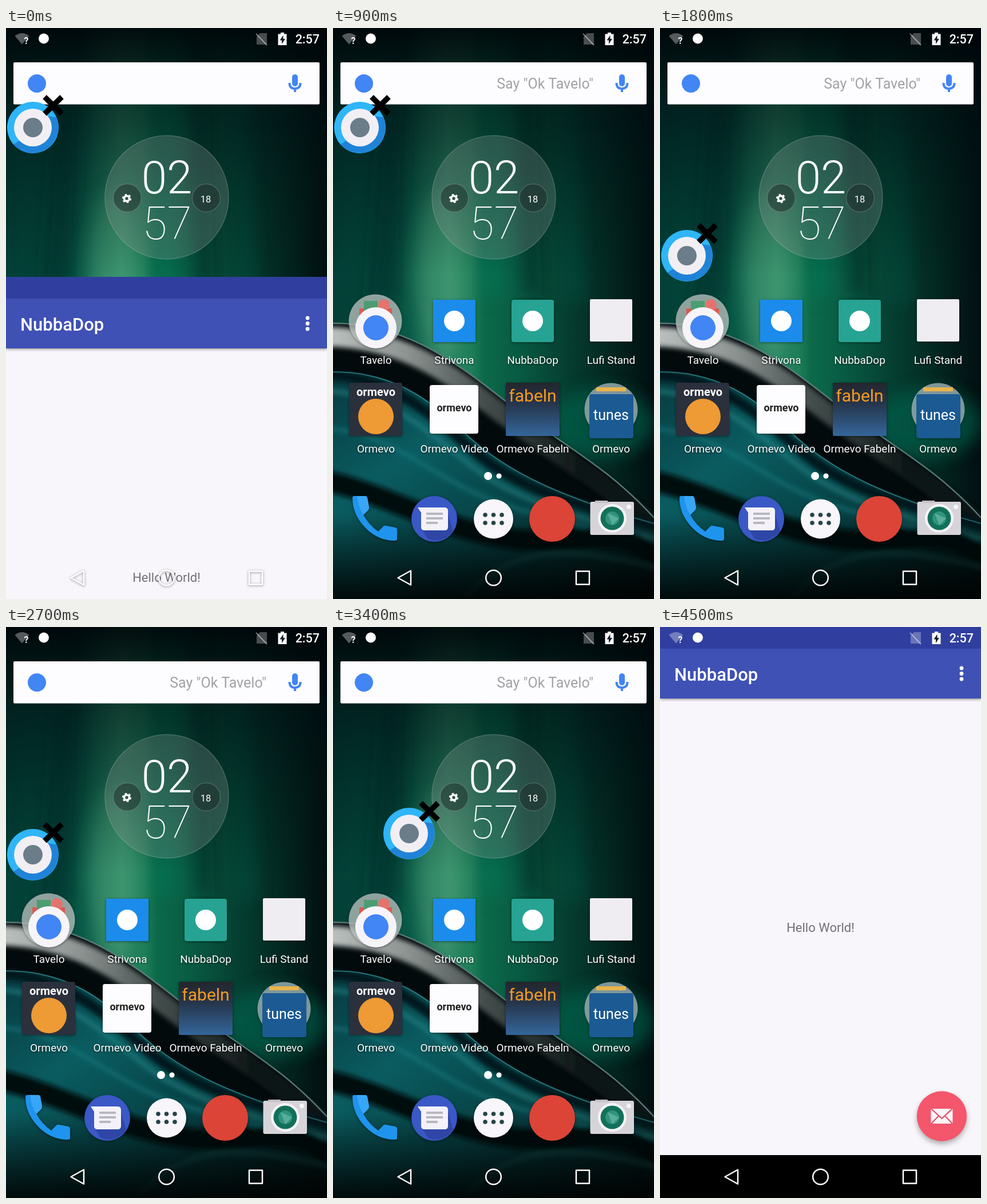
An HTML page for the animation above (4600 ms loop, 561x998 px).

```html
<!DOCTYPE html>
<html lang="en">
<head>
<meta charset="utf-8">
<title>Floating bubble</title>
<style>
  html, body { margin: 0; width: 100%; height: 100%; overflow: hidden; background: #000; }
  #stage { position: fixed; left: 0; top: 0; width: 561px; height: 998px; overflow: clip; contain: strict; }
  svg { position: absolute; left: 0; top: 0; width: 561px; height: 998px; font-family: Roboto, sans-serif; }
  .mid { text-anchor: middle; }
  #labels { font-size: 19px; fill: #fff; text-anchor: middle; filter: drop-shadow(0 1px 1.5px rgba(0,0,0,.7)); }
  .soft { filter: drop-shadow(0 1px 2px rgba(0,0,0,.45)); }
</style>
</head>
<body>
<div id="stage">
<!-- wallpaper -->
<svg viewBox="0 0 561 998">
  <defs>
    <linearGradient id="wash">
      <stop offset="0" stop-color="#033f36"/><stop offset=".12" stop-color="#03463a"/>
      <stop offset=".24" stop-color="#0a5b48"/><stop offset=".36" stop-color="#2b8562"/>
      <stop offset=".43" stop-color="#1f7f5a"/><stop offset=".47" stop-color="#0c6a4a"/>
      <stop offset=".58" stop-color="#085a42"/><stop offset=".74" stop-color="#053c30"/>
      <stop offset=".88" stop-color="#03241f"/><stop offset="1" stop-color="#020f10"/>
    </linearGradient>
    <linearGradient id="shade" x2="0" y2="1">
      <stop offset="0" stop-color="#000407" stop-opacity=".93"/>
      <stop offset=".13" stop-color="#000c10" stop-opacity=".62"/>
      <stop offset=".3" stop-color="#001214" stop-opacity=".27"/>
      <stop offset=".43" stop-color="#001214" stop-opacity="0"/>
    </linearGradient>
    <linearGradient id="rim" gradientUnits="userSpaceOnUse" x1="0" y1="0" x2="440" y2="0">
      <stop offset="0" stop-color="#b9bfbd"/><stop offset=".3" stop-color="#8b9290"/>
      <stop offset=".6" stop-color="#454e4d"/><stop offset="1" stop-color="#0b1414"/>
    </linearGradient>
    <linearGradient id="pool" x2="1" y2="1">
      <stop offset="0" stop-color="#07393f"/><stop offset=".3" stop-color="#0a5c60"/>
      <stop offset=".6" stop-color="#063f42"/><stop offset="1" stop-color="#021112"/>
    </linearGradient>
    <linearGradient id="foot" x2="0" y2="1">
      <stop offset="0" stop-color="#000" stop-opacity="0"/><stop offset="1" stop-color="#000" stop-opacity=".85"/>
    </linearGradient>
    <filter id="b4"><feGaussianBlur stdDeviation="4"/></filter>
    <filter id="b14" x="-50%" y="-50%" width="200%" height="200%"><feGaussianBlur stdDeviation="14"/></filter>
  </defs>
  <rect width="561" height="998" fill="url(#wash)"/>
  <g filter="url(#b14)">
    <ellipse cx="188" cy="430" rx="42" ry="150" fill="#5cae85" opacity=".38"/>
    <path d="M95 0H135L120 480H60Z" fill="#01221f" opacity=".45"/>
    <path d="M255 0H300L300 470H254Z" fill="#10795a" opacity=".4"/>
    <path d="M320 0H350L365 470H330Z" fill="#02201d" opacity=".4"/>
    <path d="M390 0H410L440 480H405Z" fill="#0a5a48" opacity=".3"/>
    <ellipse cx="470" cy="690" rx="90" ry="60" fill="#0a6650" opacity=".6"/>
  </g>
  <rect width="561" height="998" fill="url(#shade)"/>
  <path d="M0 515C120 515 205 575 300 650C400 728 480 765 561 855V998H0Z" fill="#030a0c"/>
  <g fill="none">
    <path d="M-20 539C110 540 190 592 285 666C370 732 450 775 580 885" stroke="url(#rim)" stroke-width="34" filter="url(#b4)"/>
    <path d="M0 516C120 516 205 576 300 651C400 729 480 766 561 856" stroke="#6f9a98" stroke-width="2.5" opacity=".75"/>
  </g>
  <path d="M0 600C90 600 155 634 225 702C300 775 400 820 561 865V998H0Z" fill="url(#pool)"/>
  <g fill="none" filter="url(#b4)">
    <path d="M-20 606C100 606 170 674 250 742S420 830 580 874" stroke="#04191b" stroke-width="18"/>
    <path d="M-20 634C80 634 150 690 230 756S400 848 580 896" stroke="#2a8b8c" stroke-width="8" opacity=".6"/>
    <path d="M-20 700C90 700 160 775 260 818S450 862 580 912" stroke="#148186" stroke-width="9" opacity=".45"/>
    <path d="M-20 790C110 815 230 905 380 895S520 895 580 935" stroke="#020b0d" stroke-width="36"/>
    <path d="M230 998C300 910 400 900 580 948" stroke="#236a67" stroke-width="5" opacity=".6"/>
  </g>
  <path d="M0 601C90 601 155 635 225 703C300 776 400 821 561 866" fill="none" stroke="#3fa6a8" stroke-width="2" opacity=".55"/>
  <rect y="850" width="561" height="148" fill="url(#foot)"/>
</svg>

<!-- home screen -->
<svg viewBox="0 0 561 998">
  <defs>
    <linearGradient id="dusk" x2="0" y2="1">
      <stop offset="0" stop-color="#23262d"/><stop offset=".4" stop-color="#26364c"/><stop offset="1" stop-color="#34669b"/>
    </linearGradient>
  </defs>
  <rect x="13" y="60" width="535" height="73.5" rx="2" fill="#fdfcfe"/>
  <circle cx="54" cy="97" r="16" fill="#4285f4"/>
  <g fill="none" stroke="#4285f4" stroke-width="4">
    <rect x="500" y="81" width="10" height="21" rx="5" fill="#4285f4" stroke="none"/>
    <path d="M495.500 96Q495.500 106 505 106T514.500 96M505 106V112"/>
  </g>
  <text id="hint" x="455" y="106" font-size="25" text-anchor="end" fill="#a3a1a6">Say "Ok Tavelo"</text>

  <circle cx="281" cy="296" r="108" fill="#8f9a96" fill-opacity=".27" stroke="#b9c4c0" stroke-opacity=".28" stroke-width="1.5"/>
  <g fill="#1c2a28" fill-opacity=".5" stroke="#a4b2ae" stroke-opacity=".28" stroke-width="1.5">
    <circle cx="212" cy="297" r="24.5"/><circle cx="350" cy="297" r="24.5"/>
  </g>
  <g fill="none" stroke="#fff">
    <circle cx="211" cy="298" r="4.5" stroke-width="3.6"/>
    <circle cx="211" cy="298" r="6.8" stroke-width="2.6" stroke-dasharray="3.56"/>
  </g>
  <g class="mid" fill="#fff">
    <text x="349" y="304.5" font-size="16.5">18</text>
    <text x="281" y="288.5" font-size="80" font-weight="300">02</text>
    <text x="281.5" y="369" font-size="79" font-weight="100">57</text>
  </g>

  <g id="icons">
    <g class="soft">
      <circle cx="74" cy="512" r="46.5" fill="#c6d0cd" fill-opacity=".72"/>
      <path d="M46 490H103V504H46Z" fill="#dc5a52"/>
      <rect x="54" y="477" width="24" height="17" fill="#4c9d72"/>
      <circle cx="89" cy="484" r="10" fill="#e5736d"/>
      <circle cx="75" cy="524" r="36" fill="#f6f4f8"/>
      <circle cx="75" cy="524" r="22" fill="#4285f4"/>

      <rect x="175" y="475" width="74" height="74" fill="#1b8ceb"/>
      <circle cx="212" cy="512" r="18" fill="#fff"/>
      <rect x="312" y="475" width="74" height="74" rx="4" fill="#27a393"/>
      <circle cx="349" cy="512" r="18" fill="#fff"/>
      <rect x="449" y="474" width="74" height="74" rx="2" fill="#efedf2"/>

      <rect x="28" y="620" width="93" height="93" rx="4" fill="#2a303c"/>
      <circle cx="75" cy="679" r="31" fill="#ee9a35"/>
      <rect x="169" y="624" width="85" height="85" rx="4" fill="#fdfcfe"/>
      <rect x="302" y="620" width="94" height="93" rx="2" fill="url(#dusk)"/>
      <circle cx="486" cy="667" r="46.5" fill="#a9bcc4" fill-opacity=".75"/>
      <rect x="460" y="628" width="52" height="7" fill="#e8b44c"/>
      <rect x="448" y="640" width="77" height="77" rx="4" fill="#1b5a93"/>
      <g class="mid">
        <text x="75" y="643" font-size="20" font-weight="700" fill="#fff">ormevo</text>
        <text x="212" y="670" font-size="18" font-weight="700" fill="#20201f">ormevo</text>
        <text x="349" y="653" font-size="30" fill="#f79a1e">fabeln</text>
        <text x="486" y="685" font-size="25" fill="#fff">tunes</text>
      </g>
    </g>
    <g id="labels"></g>
    <circle cx="271" cy="783" r="7" fill="#fff"/><circle cx="290" cy="783" r="4.6" fill="#fff"/>

    <g class="soft">
      <path d="M37 818H56Q59 818 60 821L63 838Q63 841 61 843L53 851Q63 869 79 880L88 871Q90 869 93 870L109 873Q112 874 112 877V893Q112 896 108 896Q78 896 56 873Q34 850 34 821Q34 818 37 818Z" fill="#1f94ee"/>
      <path d="M37 818H56Q59 818 60 821L63 838Q63 841 61 843L53 851Q44 838 42 818Z" fill="#38a6f6"/>
      <circle cx="177" cy="858" r="40" fill="#3a58c6"/>
      <path d="M155 876L166 893Q190 902 210 880L201 848Z" fill="#2f46a6"/>
      <path d="M148 838H195Q201 838 201 844V872Q201 878 195 878H160Q154 878 154 872V847Z" fill="#f4f2f8"/>
      <path d="M163 849H192M163 857H192M163 865H183" stroke="#b9b7c0" stroke-width="4"/>
      <circle cx="280.5" cy="858" r="34.5" fill="#f8f6fa"/>
      <g id="dots" fill="#27444a"></g>
      <circle cx="383" cy="858" r="40" fill="#db4437"/>
      <rect x="449.5" y="828" width="76.5" height="58" rx="3" fill="#d6d4d8"/>
      <path d="M458 826H480V830H458Z" fill="#c2c0c4"/>
      <circle cx="488" cy="857" r="25" fill="#f6f4f8"/>
      <circle cx="488" cy="857" r="20.5" fill="#12705a"/>
      <circle cx="488" cy="857" r="12" fill="#31937d"/>
      <path d="M480 848L500 857L488 869Z" fill="#57ad99"/>
      <circle cx="517" cy="837" r="4" fill="#f6f4f8"/>
    </g>
  </g>
</svg>

<!-- app window -->
<svg id="app" viewBox="0 0 561 998">
  <rect width="561" height="998" fill="#f8f6fa"/>
  <g id="content">
    <rect y="38" width="561" height="87" fill="#3f51b5" style="filter:drop-shadow(0 2px 2px rgba(0,0,0,.35))"/>
    <text x="25" y="93.5" font-size="31" font-weight="500" fill="#fff">NubbaDop</text>
    <g fill="#fff"><circle cx="527" cy="72" r="3.4"/><circle cx="527" cy="81.5" r="3.4"/><circle cx="527" cy="91" r="3.4"/></g>
    <text class="mid" x="280.5" y="532.5" font-size="22" fill="#737176">Hello World!</text>
    <circle cx="492.5" cy="855" r="43.7" fill="#f4566c" style="filter:drop-shadow(0 5px 5px rgba(0,0,0,.3))"/>
    <rect x="473.5" y="842" width="38" height="26" fill="#f8f3f6"/>
    <path d="M474 842L492.5 859L511 842M474 868L487 854.5M511 868L498 854.5" fill="none" stroke="#e2566a" stroke-width="2.3"/>
  </g>
  <rect width="561" height="38" fill="#303f9f"/>
</svg>

<!-- system bars -->
<svg viewBox="0 0 561 998">
  <rect id="navBack" y="923" width="561" height="75" fill="#000"/>
  <path d="M15.5 14Q28 4 40.5 14L28 28.5Z" fill="#fff" opacity=".33"/>
  <text x="31.5" y="28" font-size="16" font-weight="700" fill="#fff">?</text>
  <circle cx="66" cy="18.5" r="9" fill="#fff"/>
  <path d="M444 9H456V29H438V15Z" fill="#fff" opacity=".28"/>
  <path d="M437 10L456 30" stroke="#fff" stroke-width="2" opacity=".45"/>
  <path d="M480 8H486V10.5H490.5V30H475.5V10.5H480Z" fill="#fff"/>
  <path d="M484.5 12.5L478.5 21.5H482V28L488 19H484.5Z" fill="#16202c"/>
  <text x="548" y="27" font-size="21.5" font-weight="500" text-anchor="end" fill="#fff">2:57</text>
  <g class="soft" fill="none" stroke="#fff" stroke-width="2.5" stroke-linejoin="round">
    <path d="M113.5 961L136 948.5V973.5Z"/><circle cx="280.5" cy="961" r="13.3"/><rect x="425" y="949.5" width="23" height="23"/>
  </g>
</svg>

<!-- floating bubble -->
<svg viewBox="0 0 561 998">
  <g id="bubble">
    <circle r="45" fill="#2fb5f8"/>
    <path d="M-34 29.5A45 45 0 0 0 41 -18L26 -20L-24 23Z" fill="#1f83d8"/>
    <circle r="33" fill="#f1eff4"/>
    <circle r="17" fill="#6a7d89"/>
    <path d="M20.5 -53.5L50.5 -24M50.5 -53.5L20.5 -24" stroke="#000" stroke-width="9.5"/>
  </g>
</svg>
</div>

<script>
const $ = id => document.getElementById(id);
const LOOP = 4600, TICK = 100;

const names = [
  ["Tavelo", "Strivona", "NubbaDop", "Lufi Stand"],
  ["Ormevo", "Ormevo Video", "Ormevo Fabeln", "Ormevo"]
];
$("labels").innerHTML = names.map((row, r) => row.map((name, c) =>
  `<text x="${75 + c * 137}" y="${587 + r * 154.5}">${name}</text>`).join("")).join("");

$("dots").innerHTML = [0, 1, 2, 3, 4, 5].map(i =>
  `<circle cx="${266 + i % 3 * 14.5}" cy="${851 + (i > 2) * 14}" r="3.8"/>`).join("");

// time, x, y, visible
const bubbleSteps = [
  [0, 47, 174, 1], [1000, 47, 190, 1], [1100, 47, 229, 1], [1200, 47, 283, 1], [1300, 47, 340, 1],
  [1400, 47, 380, 1], [1500, 47, 392, 1], [1600, 47, 396, 1], [1800, 47, 398, 1],
  [2800, 55, 396, 1], [2900, 72, 390, 1], [3000, 92, 381, 1], [3100, 110, 372, 1],
  [3200, 124, 365, 1], [3300, 131, 362, 1], [3400, 133, 361, 1], [4400, 133, 361, 0]
];
// time, offset, window opacity, content opacity
const appSteps = [
  [0, 435, 1, 1], [100, 850, .4, 1], [200, 970, .15, 1], [300, 998, 0, 0],
  [4000, 960, .12, 0], [4100, 835, .4, 0], [4200, 300, .9, 0], [4300, 60, 1, 0],
  [4400, 0, 1, .6], [4500, 0, 1, 1]
];
// time, icon opacity, hint opacity
const homeSteps = [[0, 0, 0], [100, .5, 0], [200, .9, .4], [300, 1, .8], [400, 1, 1]];

const at = (steps, t) => steps.findLast(s => s[0] <= t);

function draw(now) {
  const t = Math.floor(now % LOOP / TICK) * TICK;
  const [, x, y, shown] = at(bubbleSteps, t);
  const [, offset, alpha, inner] = at(appSteps, t);
  const [, icons, hint] = at(homeSteps, t);
  $("bubble").setAttribute("transform", `translate(${x} ${y})`);
  $("bubble").style.opacity = shown;
  $("app").style.transform = `translateY(${offset}px)`;
  $("app").style.opacity = alpha;
  $("content").style.opacity = inner;
  $("icons").style.opacity = icons;
  $("hint").style.opacity = hint;
  $("navBack").style.opacity = t >= 4400 ? 1 : 0;
}

const start = performance.now();
function loop() {
  draw(performance.now() - start);
  requestAnimationFrame(loop);
}
loop();
</script>
</body>
</html>
```
